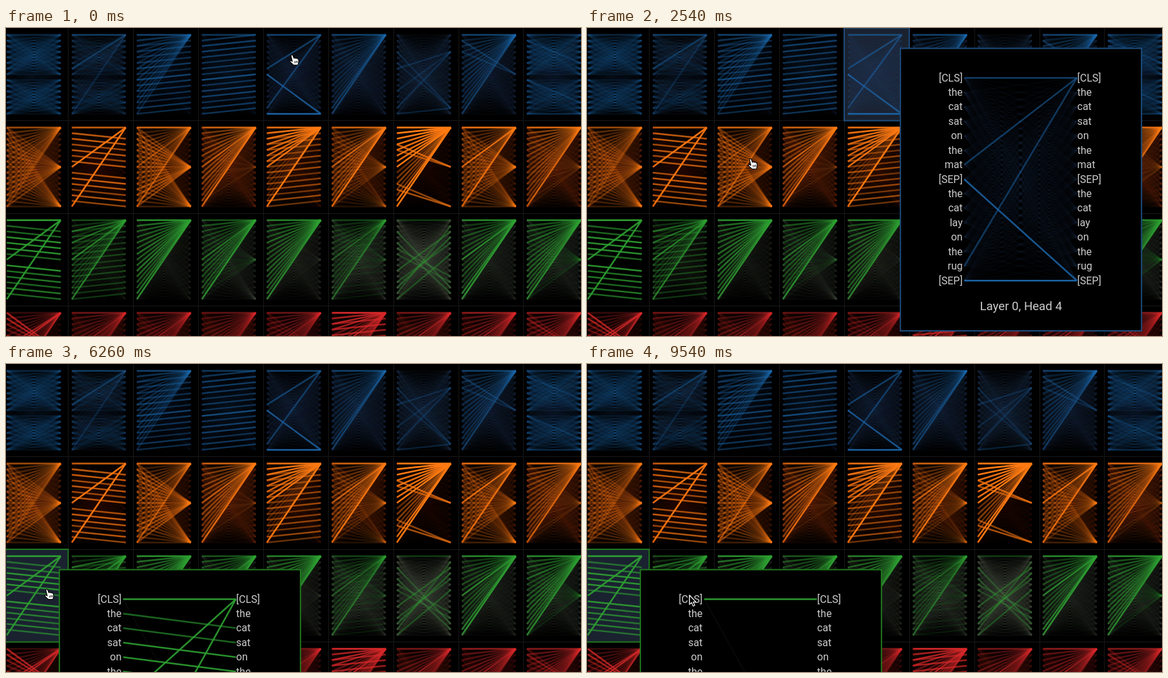
Write an HTML page with a canvas that moves like this. It is 892 px wide and 477 px high and loops after 9620 ms.

```html
<!DOCTYPE html>
<html lang="en">
<head>
<meta charset="utf-8">
<title>Attention heads</title>
<style>
  html, body { margin: 0; width: 100%; height: 100%; overflow: hidden; background: #000; }
  canvas { display: block; width: 892px; height: 477px; }
</style>
</head>
<body>
<canvas id="stage" width="892" height="477"></canvas>
<script>
const W = 892, H = 477, LOOP = 9620, STEP = 80;
const PITCH_X = 100.85, PITCH_Y = 143.5;
const ctx = document.getElementById('stage').getContext('2d');
const tokens = '[CLS] the cat sat on the mat [SEP] the cat lay on the rug [SEP]'.split(' ');
const N = tokens.length;

const layers = [
  { color: '#1c68ac', weak: '#2a4468', edge: '#1d4c7c' },
  { color: '#ff7a12', weak: '#9c3c12', edge: '#b45a12' },
  { color: '#2ea032', weak: '#5a6654', edge: '#20781f' },
  { color: '#d8282a', weak: '#7c2018', edge: '#982020' }
];

// f: to first token, s/e: to the separators, n/p: to next/previous,
// k: within the same sentence, b: everywhere, i>j=w: one link
const heads = [
  [
    'k.17 b.03 0>0=.35',
    'k.13 b.035 f.12 0>0=.55 6>0=.45 14>0=.25',
    'f.36 p.5 b.03 0>0=.6 8>7=.6',
    'p.58 b.035 0>0=.5 8>7=.7',
    'b.07 0>0=.6 6>0=.55 13>0=.5 7>14=.85 14>14=.95',
    'f.3 b.07 0>0=.6 14>0=.55 13>0=.45',
    'b.08 k.07 6>3=.3 10>3=.25 13>3=.3 3>13=.3 5>13=.25 14>13=.3',
    'f.38 b.065 0>0=.6 1>7=.4 3>7=.3 14>0=.5',
    'k.16 b.05 0>0=.4 1>5=.35 8>12=.35 14>14=.4'
  ],
  [
    'f.36 s.36 e.32 b.07 0>0=.6',
    'n.8 b.03 0>0=.75 7>0=.95 14>0=.95',
    'f.3 s.5 e.36 b.045 0>0=.8 14>0=.6 7>0=.5',
    'f.5 b.075 s.12 0>0=.8 14>0=.85 7>0=.7',
    'f.25 p.6 b.035 0>0=.9 1>0=.9 2>0=.9 3>0=.8 4>0=.8 5>0=.8 6>0=.8 7>0=.9 14>0=1',
    'f.45 s.25 e.15 b.06 0>0=.8 7>0=.75 14>0=.9',
    'f.5 b.02 0>0=1 1>0=1 2>0=1 3>0=.9 4>0=.9 5>0=.9 6>0=.9 7>0=1 13>0=.9 14>0=1 3>7=.75 4>7=.6 10>14=.55 11>14=.65',
    'f.32 s.34 e.28 b.055 0>0=.9 7>0=.85 14>0=.85',
    'f.5 b.075 s.15 0>0=.85 14>0=.75'
  ],
  [
    'n.9 0>0=.95 7>0=.9 14>0=.9 0>14=.07',
    'f.36 p.38 b.03 0>0=.45 2>0=.6 4>0=.6 7>0=.75 14>0=.75',
    'f.72 b.035 0>0=.85 14>0=.85',
    'f.48 s.14 e.1 b.04 0>0=.5 7>0=.65 14>0=.85',
    'f.6 b.045 s.08 0>0=.75 14>0=.8',
    'f.3 b.065 s.12 p.14 0>0=.4 7>0=.5 14>0=.6',
    'b.1 s.1 0>0=.35 2>12=.45 4>13=.4 5>10=.4 9>2=.45 11>4=.4 12>3=.45 14>6=.4 13>1=.35 6>11=.35',
    'f.48 b.05 0>0=.8 7>0=.8 13>0=.75 14>0=.9',
    'f.6 b.05 s.16 0>0=.8 14>0=.8'
  ],
  [
    'f.3 s.55 b.04 0>7=.8 1>7=.75 7>0=.8 6>0=.7 14>0=.7',
    'f.36 b.07 0>0=.5 7>0=.5',
    'f.34 s.15 b.07 0>0=.5 7>0=.5',
    'f.34 b.08 0>0=.45',
    'f.36 s.2 b.06 0>0=.5 7>0=.5',
    'f.55 p.85 b.04 0>0=1 2>0=.8 3>0=.7 7>0=.8',
    'f.4 b.07 0>0=.55 7>0=.6',
    'f.45 b.06 0>0=.65 7>0=.6',
    'f.42 s.3 b.06 0>0=.6 1>7=.5'
  ]
];

const rules = {
  f: (i, j) => j === 0,
  s: (i, j) => j === 7,
  e: (i, j) => j === 14,
  n: (i, j) => j === i + 1 && i !== 0 && i !== 7,
  p: (i, j) => j === i - 1,
  k: (i, j) => (i < 8) === (j < 8),
  b: () => true
};

function randomizer(seed) {
  return () => {
    seed = (seed * 1664525 + 1013904223) >>> 0;
    return seed / 4294967296;
  };
}

function parseHead(spec, seed) {
  const random = randomizer(seed);
  const weights = Array.from({ length: N }, () => new Array(N).fill(0));
  for (const part of spec.split(' ')) {
    const link = part.match(/^(\d+)>(\d+)=(.+)$/);
    if (link) {
      weights[link[1]][link[2]] = +link[3];
      continue;
    }
    const rule = rules[part[0]], level = +part.slice(1);
    for (let i = 0; i < N; i++) {
      for (let j = 0; j < N; j++) {
        if (!rule(i, j)) continue;
        const w = level * (0.65 + 0.35 * random());
        weights[i][j] = Math.max(weights[i][j], w);
      }
    }
  }
  return weights;
}

const weights = heads.map((row, r) => row.map((spec, c) => parseHead(spec, 97 + r * 1009 + c * 7919)));
const cellX = c => -4.4 + PITCH_X * c;
const cellY = r => PITCH_Y * r;

function drawLinks(g, r, c, x0, x1, y, gap, only = -1) {
  g.lineWidth = 2.6;
  weights[r][c].forEach((row, i) => {
    if (only >= 0 && i !== only) return;
    row.forEach((w, j) => {
      if (!w) return;
      g.globalAlpha = w;
      g.strokeStyle = w < 0.11 ? layers[r].weak : layers[r].color;
      g.beginPath();
      g.moveTo(x0, y + i * gap);
      g.lineTo(x1, y + j * gap);
      g.stroke();
    });
  });
  g.globalAlpha = 1;
}

function drawThumb(g, r, c) {
  const x = cellX(c);
  drawLinks(g, r, c, x + 5.6, x + 89.4, cellY(r) + 10.6, 8.74);
}

function makeGrid() {
  const sheet = document.createElement('canvas');
  sheet.width = W;
  sheet.height = H;
  const g = sheet.getContext('2d');
  g.fillStyle = '#000';
  g.fillRect(0, 0, W, H);
  g.fillStyle = '#181818';
  for (let c = 1; c < 9; c++) g.fillRect(Math.round(cellX(c)), 0, 1, H);
  for (let r = 1; r < 4; r++) g.fillRect(0, Math.floor(cellY(r)), W, 1);
  heads.forEach((row, r) => row.forEach((_, c) => drawThumb(g, r, c)));
  return sheet;
}

const grid = makeGrid();

function drawBox(x, y, w, h, fill, edge) {
  ctx.fillStyle = fill;
  ctx.fillRect(x, y, w, h);
  ctx.strokeStyle = edge;
  ctx.lineWidth = 2;
  ctx.strokeRect(x, y, w, h);
}

function drawDetail({ r, c }, hovered) {
  const { edge } = layers[r];
  drawBox(cellX(c), cellY(r), PITCH_X, PITCH_Y, '#1a2230', edge);
  drawThumb(ctx, r, c);

  const x = cellX(c) + 87.2, y = cellY(r) + 31.5, gap = 22.43;
  drawBox(x, y, 374, 437.5, '#000', edge);
  drawLinks(ctx, r, c, x + 99, x + 273.8, y + 45.7, gap, hovered);
  ctx.fillStyle = '#ccc';
  ctx.font = '16px Roboto, sans-serif';
  tokens.forEach((token, i) => {
    const base = y + 51 + i * gap;
    ctx.textAlign = 'right';
    ctx.fillText(token, x + 96.5, base);
    ctx.textAlign = 'left';
    ctx.fillText(token, x + 274.3, base);
  });
  ctx.font = '18.67px Roboto, sans-serif';
  ctx.textAlign = 'center';
  ctx.fillText(`Layer ${r}, Head ${c}`, x + 187, y + 405);
}

const handShape = new Path2D('M-5-6.2Q-4-8.6-2.2-6.8L-.2-2 .8-2.6Q2.2-3 2.9-1.9L4-2.3Q5.3-2.2 5.5-1.1 6.9-1.1 7 .6L7 4 6 8-1 8.4-6 3.6Q-7.2 1.6-5 1.4L-2.8 2.8Z');
const handCreases = new Path2D('M.4 2.4L1.2 5.6M2.5 2L3.2 5.2M4.5 1.6L5 4.8');
const arrowShape = new Path2D('M-4-8V6.4L-.8 3.5 1.6 9 4.2 7.8 1.8 2.6H6Z');

function drawCursor({ x, y, arrow }) {
  ctx.save();
  ctx.translate(x, y);
  ctx.lineJoin = 'round';
  ctx.lineWidth = 1.2;
  ctx.fillStyle = arrow ? '#000' : '#fff';
  ctx.strokeStyle = arrow ? '#fff' : '#000';
  const shape = arrow ? arrowShape : handShape;
  ctx.fill(shape);
  ctx.stroke(shape);
  if (!arrow) {
    ctx.lineWidth = 0.9;
    ctx.stroke(handCreases);
  }
  ctx.restore();
}

const smooth = p => p * p * (3 - 2 * p);
const moves = [
  { start: 0, steps: 1, from: [447, 49], to: [447, 49] },
  { start: 1500, steps: 14, from: [447, 49], to: [257, 210] },
  { start: 3040, steps: 1, from: [247, 216], to: [247, 216] },
  { start: 4040, steps: 10, from: [247, 216], to: [64, 356] },
  { start: 6260, steps: 10, from: [64, 356], to: [163, 366] }
];
const SCAN_START = 7060, SCAN_END = 9540;

function cursorAt(t) {
  if (t >= SCAN_START) {
    const tick = SCAN_START + STEP * Math.floor((t - SCAN_START) / STEP);
    const p = Math.min(1, (tick - SCAN_START) / (SCAN_END - SCAN_START));
    return { x: 163, y: 366 + 314 * Math.sin(Math.PI * p), arrow: true };
  }
  const { start, steps, from, to } = moves.filter(m => m.start <= t).pop();
  const p = smooth(Math.min(1, (Math.floor((t - start) / STEP) + 1) / steps));
  const [x, y] = from.map((v, k) => v + (to[k] - v) * p);
  return { x, y, arrow: t >= 6260 && x > 84 };
}

function detailAt(t) {
  if (t < 500) return null;
  if (t < 3040) return { r: 0, c: 4 };
  return t < 5260 ? { r: 1, c: 2 } : { r: 2, c: 0 };
}

function hoveredToken({ x, y, arrow }) {
  return arrow && x > 138 ? Math.max(0, Math.min(N - 1, Math.round((y - 366) / 22.43))) : -1;
}

function render(t) {
  const cursor = cursorAt(t), detail = detailAt(t);
  ctx.drawImage(grid, 0, 0);
  if (detail) drawDetail(detail, hoveredToken(cursor));
  drawCursor(cursor);
}

const began = performance.now();
function frame() {
  render((performance.now() - began) % LOOP);
  requestAnimationFrame(frame);
}
frame();
</script>
</body>
</html>
```
